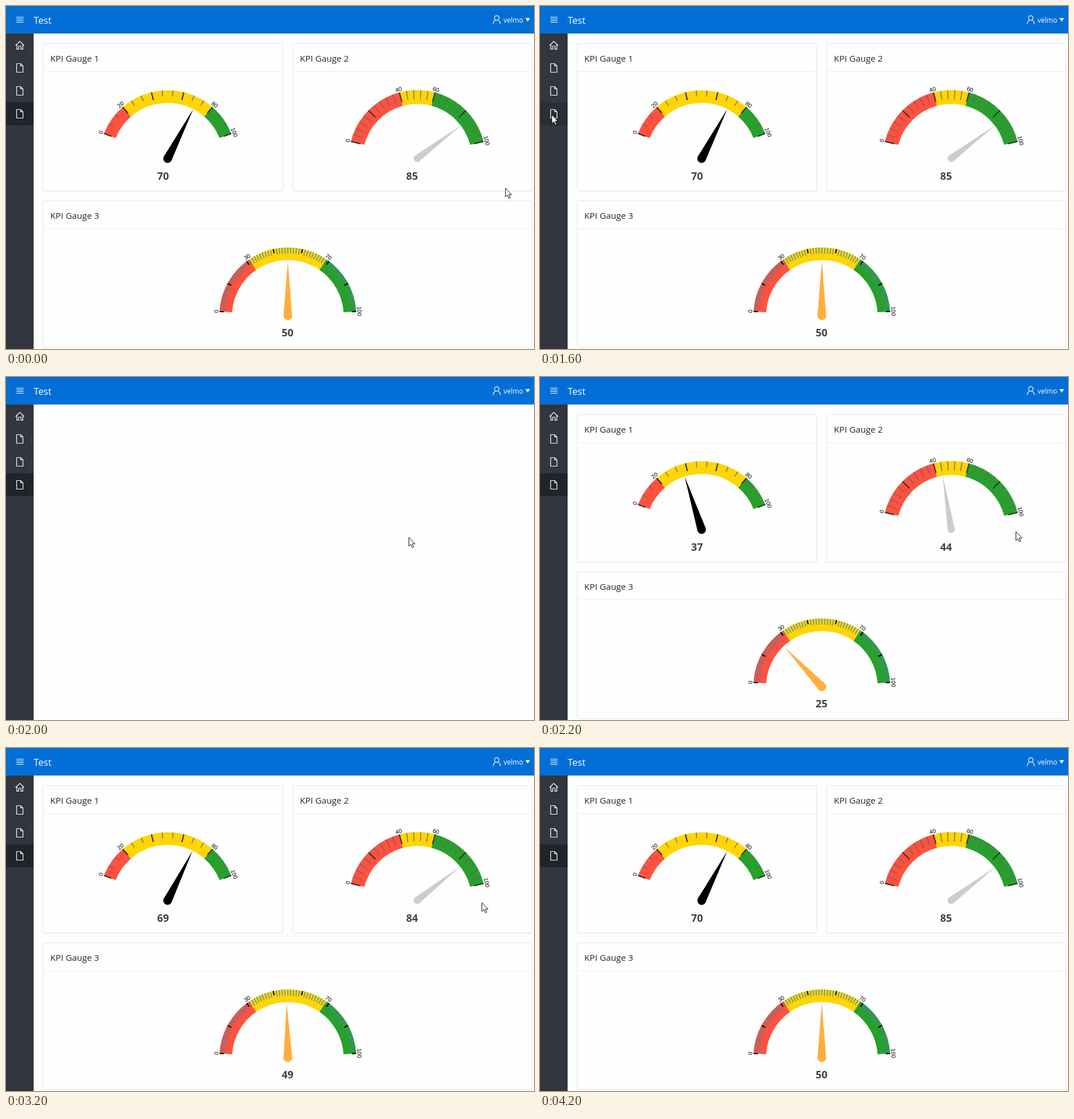
Write an HTML page that moves like this. It is 918 px wide and 598 px high and loops after 7 s.

```html
<!DOCTYPE html>
<html lang="en">
<head>
<meta charset="utf-8">
<title>KPI gauges</title>
<style>
  html, body { margin: 0; width: 100%; height: 100%; overflow: hidden; background: #fefefe; }
  svg { display: block; }
  text { font-family: "Open Sans", "Noto Sans", sans-serif; }
  .title { font-size: 15.2px; fill: #262626; }
  .value { font-size: 18px; font-weight: 700; fill: #404040; text-anchor: middle; }
  .label { font: 10px Arial, "Liberation Sans", sans-serif; text-anchor: middle; }
  .card { fill: #fefefe; stroke: #e5e5e8; }
  .icon { fill: none; stroke: #fff; stroke-width: 1.2; }
</style>
</head>
<body>
<svg id="stage" width="918" height="598" viewBox="0 0 918 598">
  <rect width="918" height="598" fill="#fefefe"/>
  <g id="content"></g>
  <rect id="side" y="48" width="48" height="550" fill="#32363e"/>
  <g id="menu">
    <rect id="active" y="168" width="48" height="40" fill="#20242b"/>
    <path class="icon" d="M16.5 69 L24 61.5 L31.5 69 M18.8 67 V75.4 H22 V70 H26 V75.4 H29.2 V67"/>
  </g>
  <rect width="918" height="48" fill="#036fd6"/>
  <path class="icon" style="stroke-width:1" d="M18 19.5H30.5M18 22.5H30.5M18 25.5H30.5M18 28.5H30.5"/>
  <text x="48" y="31" font-size="16.6" fill="#fff">Test</text>
  <g id="user">
    <circle class="icon" cx="853.3" cy="20.8" r="4"/>
    <path class="icon" d="M847.2 31.5 C847.2 27.5 849 25.8 851 24.5 M855.6 24.5 C857.6 25.8 859.4 27.5 859.4 31.5"/>
    <text x="865" y="29" font-size="12" fill="#fff">velmo</text>
    <path d="M903 21 H911 L907 27.2 Z" fill="#fff"/>
  </g>
  <path id="cursor" d="M.5 .7 V16 L4 12.8 L6.3 18.2 L8.7 17.2 L6.4 11.9 H11.2 Z" fill="#fff" stroke="#111"/>
</svg>
<script>
const LOOP = 7000, STEP = 200, OUTER = 119;
const BLANK = 1800, RELOAD = 2000, SHOW = 2200;
const RED = '#ff513f', YELLOW = '#ffd506', GREEN = '#28a02c';

const gauges = [
  { x: 281, y: 266, off: .12, width: 22, cuts: [20, 80], divs: 5, subs: 3, divLen: 14, subLen: 10,
    divColor: '#333', subColor: '#666', tip: 97, hub: 7.5, color: '#000',
    value: 70, textX: 273, textY: 303, rate: .00399, start: 2011 },
  { x: 715, y: 265.7, off: .08, width: 24, cuts: [40, 60], divs: 5, subs: 5, divLen: 17, subLen: 16,
    divColor: '#333', subColor: '#666', tip: 95, hub: 6.2, color: '#ccc',
    value: 85, textX: 706, textY: 303, rate: .00388, start: 2012 },
  { x: 490, y: 540, off: .02, width: 22, cuts: [30, 70], divs: 7, subs: 10, divLen: 7.5, subLen: 10.5,
    divColor: '#000', subColor: '#4a86a0', tip: 95, hub: 7.5, color: '#ffae3e',
    value: 50, textX: 489.5, textY: 576, rate: .0036, start: 2007 }
];
const cards = [[64.5, 65.5, 417, 257], [498.5, 65.5, 416, 257], [64.5, 339.5, 850, 256]];
// time, x, y of the pointer; no position hides it
const moves = [[0, 868, 317], [200, 441, 333], [800, 6, 182], [1000, 14, 187], [1200, 20, 189],
  [1800, 500, 289], [2000, 700, 279], [2200, 827, 269], [3600, 771, 347], [3800, 769, 391],
  [4000, 760, 525], [4200]];

const $ = id => document.getElementById(id);
const content = $('content');

function add(parent, tag, attrs, text) {
  const el = document.createElementNS('http://www.w3.org/2000/svg', tag);
  for (const key in attrs) el.setAttribute(key, attrs[key]);
  if (text !== undefined) el.textContent = text;
  return parent.appendChild(el);
}

const angle = (g, v) => Math.PI * (1 + g.off + v / 100 * (1 - 2 * g.off));
const degrees = (g, v) => angle(g, v) * 180 / Math.PI;
const point = (g, v, r) => [r * Math.cos(angle(g, v)), r * Math.sin(angle(g, v))].map(n => n.toFixed(2)).join(' ');

function band(g, root, from, to, color) {
  const r = OUTER - g.width / 2;
  add(root, 'path', { d: `M${point(g, from, r)} A${r} ${r} 0 0 1 ${point(g, to, r)}`,
    fill: 'none', stroke: color, 'stroke-width': g.width });
}

function tick(g, root, v, len, color, width) {
  add(root, 'path', { d: `M${point(g, v, OUTER)} L${point(g, v, OUTER - len)}`, stroke: color, 'stroke-width': width });
}

function buildGauge(g) {
  const root = add(content, 'g', { transform: `translate(${g.x} ${g.y})` });
  const stops = [0, ...g.cuts, 100];
  [RED, YELLOW, GREEN].forEach((color, i) => band(g, root, stops[i], stops[i + 1], color));
  const count = g.divs * g.subs;
  for (let i = 0; i <= count; i++) {
    const v = i / count * 100;
    if (i % g.subs) tick(g, root, v, g.subLen, g.subColor, 1.3);
    else tick(g, root, v, g.divLen, g.divColor, 2.1);
  }
  for (const v of stops)
    add(root, 'text', { class: 'label', y: -OUTER - 2.2, transform: `rotate(${degrees(g, v) + 90})` }, v);
  g.needle = add(root, 'g', { fill: g.color });
  add(g.needle, 'path', { d: `M0 ${-g.hub} L${g.tip} 0 L0 ${g.hub} Z` });
  add(g.needle, 'circle', { r: g.hub });
  g.text = add(content, 'text', { class: 'value', x: g.textX, y: g.textY });
}

cards.forEach(([x, y, width, height], i) => {
  add(content, 'rect', { x: x + .5, y: y + 1, width, height, rx: 2, fill: '#f3f3f5' });
  add(content, 'rect', { class: 'card', x, y, width, height, rx: 2 });
  add(content, 'path', { d: `M${x} ${y + 49} h${width}`, stroke: '#ececee' });
  add(content, 'text', { class: 'title', x: x + 12.5, y: y + 31.3 }, 'KPI Gauge ' + (i + 1));
});
gauges.forEach(buildGauge);
for (const y of [100.5, 140.5, 180.5])
  add($('menu'), 'path', { class: 'icon', d: `M18.5 ${y} H25.5 L29.5 ${y + 4} V${y + 15} H18.5 Z M25.5 ${y} v4 h4` });

const show = (el, on) => el.setAttribute('visibility', on ? 'visible' : 'hidden');

function draw(t) {
  const blank = t >= BLANK && t < RELOAD;
  show(content, t < BLANK || t >= SHOW);
  show($('menu'), !blank);
  $('side').setAttribute('width', blank ? 200 : 48);
  $('user').setAttribute('transform', `translate(${blank ? 17 : 0} 0)`);
  $('active').setAttribute('fill', t >= 1200 && t < BLANK ? '#2a2e35' : '#20242b');

  for (const g of gauges) {
    const v = t < BLANK ? g.value : g.value * (1 - Math.exp(-g.rate * Math.max(0, t - g.start)));
    g.needle.setAttribute('transform', `rotate(${degrees(g, v)})`);
    g.text.textContent = v.toFixed(0);
  }

  const [, x, y] = moves.filter(m => m[0] <= t).pop();
  show($('cursor'), x !== undefined);
  if (x !== undefined) $('cursor').setAttribute('transform', `translate(${x} ${y})`);
}

const begin = performance.now();
function loop() {
  const t = (performance.now() - begin) % LOOP;
  draw(Math.floor(t / STEP) * STEP);
  requestAnimationFrame(loop);
}
loop();
</script>
</body>
</html>
```
